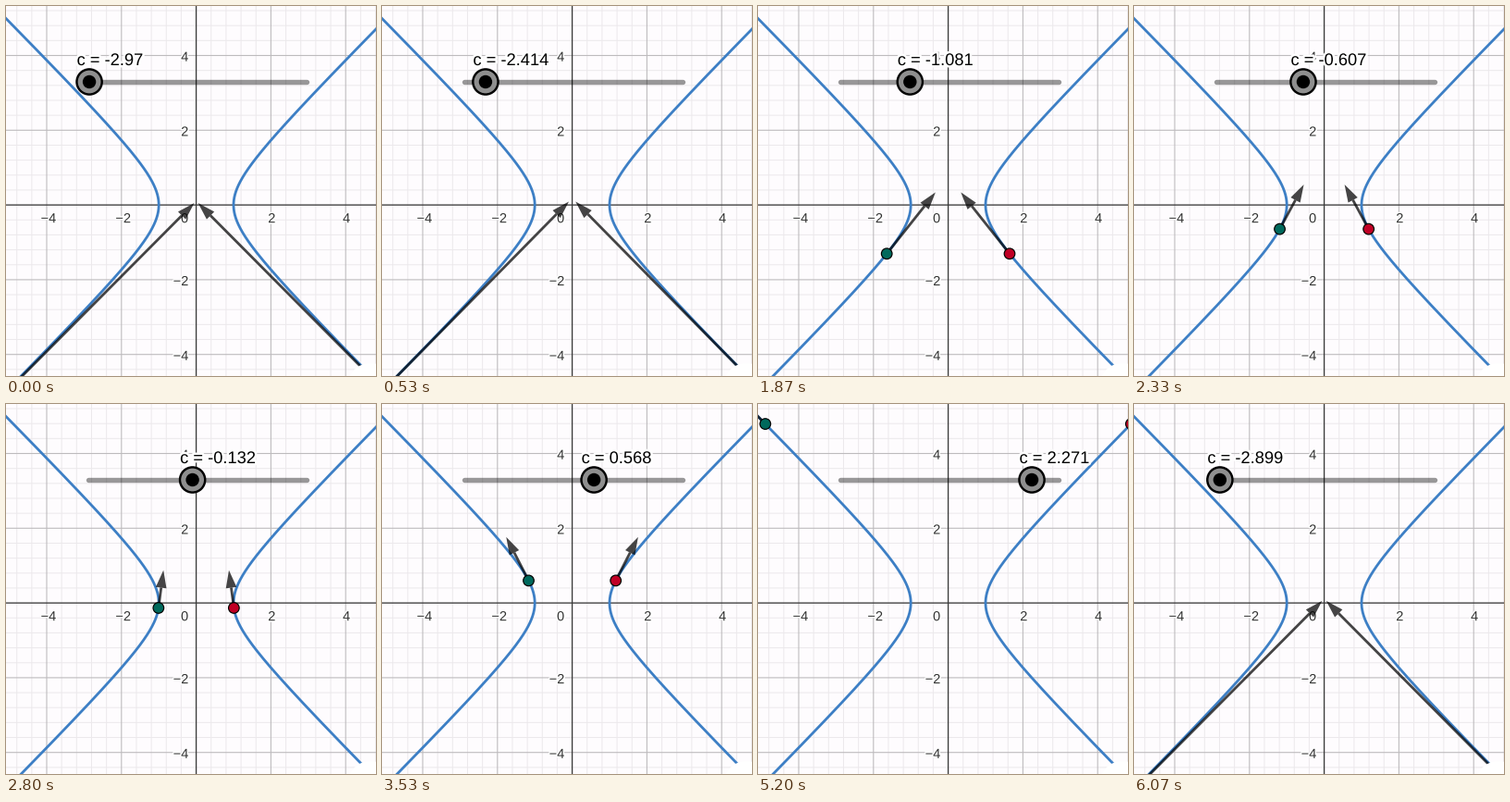
These frames come from a looping animation (400 by 400 pixels, 6.14 s). A matplotlib script:

```python
import numpy as np
import matplotlib.pyplot as plt
from matplotlib.animation import FuncAnimation
from matplotlib.collections import LineCollection
from matplotlib.patches import Circle, Polygon
from matplotlib.patheffects import withStroke

SIZE, DPI = 400, 100
TICK, LOOP = 20, 6140  # ms
STEPS_PER_MS = 0.015  # the picture is held for 1/15 s
OX, OY, UNIT = 205.6, 215.1, 40.4
PT = 72 / DPI  # points per pixel
TRACK_X, TRACK_Y, TRACK_UNIT = 206.8, 82, 39.3
HEAD_LEN, HEAD_HALF = 19, 5.8

# slider value against step; it wraps from 3 back to -3
KEY_STEPS = [0, 16, 28, 42, 53, 66, 91]
KEY_VALUES = [-2.97, -1.858, -1.081, -0.132, 0.568, 1.504, 3.101]

plt.rcParams["font.family"] = "Liberation Sans"
fig = plt.figure(figsize=(SIZE / DPI, SIZE / DPI), dpi=DPI)
ax = fig.add_axes([0, 0, 1, 1])
ax.set_xlim(0, SIZE)
ax.set_ylim(SIZE, 0)
ax.axis("off")
fig.set_facecolor("#fefcfe")


def px(x, y):
    return np.array([OX + UNIT * x, OY - UNIT * y])


def line(xs, ys, color, width, z, **kw):
    return ax.plot(xs, ys, color=color, lw=width * PT, zorder=z, **kw)[0]


def label(x, y, s, size, color, z, halo, ha="left"):
    return ax.text(x, y, s, fontsize=size * PT, color=color, zorder=z,
                   ha=ha, va="baseline",
                   path_effects=[withStroke(linewidth=halo * PT, foreground="white")])


def grid_lines(values, color, width, z):
    segs = []
    for v in values:
        x, y = px(v, v)
        segs += [[(x, 0), (x, SIZE)], [(0, y), (SIZE, y)]]
    ax.add_collection(LineCollection(segs, colors=color, linewidths=width * PT,
                                     zorder=z, snap=False), autolim=False)


def draw_grid():
    grid_lines([k * 0.4 for k in range(-13, 14) if k % 5], "#ece9ec", 1, 1)
    grid_lines((-4, -2, 2, 4), "#bdbbbd", 1.1, 2)
    grid_lines([0], "#383838", 1.3, 3)
    for v in (-4, -2, 2, 4):
        text = str(v).replace("-", "\u2212")
        x, y = px(v, v)
        label(x + (0.9 if v > 0 else 1.9), 234.2, text, 14.6, "#333333", 4, 3, "center")
        label(197.3, y + 6.2, text, 14.6, "#333333", 4, 3, "right")
    label(197.3, 234.2, "0", 14.6, "#333333", 4, 3, "right")


def draw_curve():
    t = np.linspace(-2.6, 2.6, 400)
    for side in (-1, 1):
        line(*px(side * np.cosh(t), np.sinh(t)), "#3d7fc5", 2.8, 5)


class Mover:
    """Point on one branch with its velocity vector."""

    def __init__(self, side, color):
        self.side = side
        self.shaft = line([], [], "black", 2.8, 6, alpha=0.73,
                          solid_capstyle="butt")
        self.head = ax.add_patch(Polygon(np.zeros((3, 2)), fc="black", ec="none",
                                         alpha=0.73, zorder=6))
        self.dot = ax.add_patch(Circle((0, 0), 5.8, fc=color, ec="black",
                                       lw=1.2 * PT, zorder=7))

    def place(self, c):
        start = px(self.side * np.cosh(c), np.sinh(c))
        tip = px(self.side * np.exp(c), np.exp(c))
        u = (tip - start) / np.hypot(*(tip - start))
        n = np.array([-u[1], u[0]]) * HEAD_HALF
        base = tip - u * HEAD_LEN
        self.shaft.set_data([start[0], base[0]], [start[1], base[1]])
        self.head.set_xy([tip, base + n, base - n])
        self.dot.center = start


draw_grid()
draw_curve()
movers = [Mover(-1, "#00695c"), Mover(1, "#c00025")]
ax.add_patch(Circle((394, 411), 25, fc="white", ec="none", zorder=8))

line(TRACK_X + TRACK_UNIT * np.array([-3, 3]), [TRACK_Y] * 2, "black", 5.4, 9,
     alpha=0.4, solid_capstyle="round")
knob = ax.add_patch(Circle((0, TRACK_Y), 13.6, fc="#8f8f8f", ec="black",
                           lw=2.4 * PT, zorder=10))
core = ax.add_patch(Circle((0, TRACK_Y), 7.2, fc="black", ec="none", zorder=11))
caption = label(0, 64, "", 18.3, "black", 12, 5)


def update(i):
    # rounded to the nearest tick at which a new step may begin
    step = int((i + 0.7) * TICK * STEPS_PER_MS)
    c = np.interp(step, KEY_STEPS, KEY_VALUES)
    if c > 3:
        c -= 6
    for m in movers:
        m.place(c)
    x = TRACK_X + TRACK_UNIT * c
    knob.center = core.center = (x, TRACK_Y)
    caption.set_x(x - 13.5)
    caption.set_text("c = " + f"{c:.3f}".rstrip("0").rstrip("."))


anim = FuncAnimation(fig, update, frames=LOOP // TICK, interval=TICK,
                     init_func=lambda: update(0), repeat=True, repeat_delay=0)
plt.show()
```
